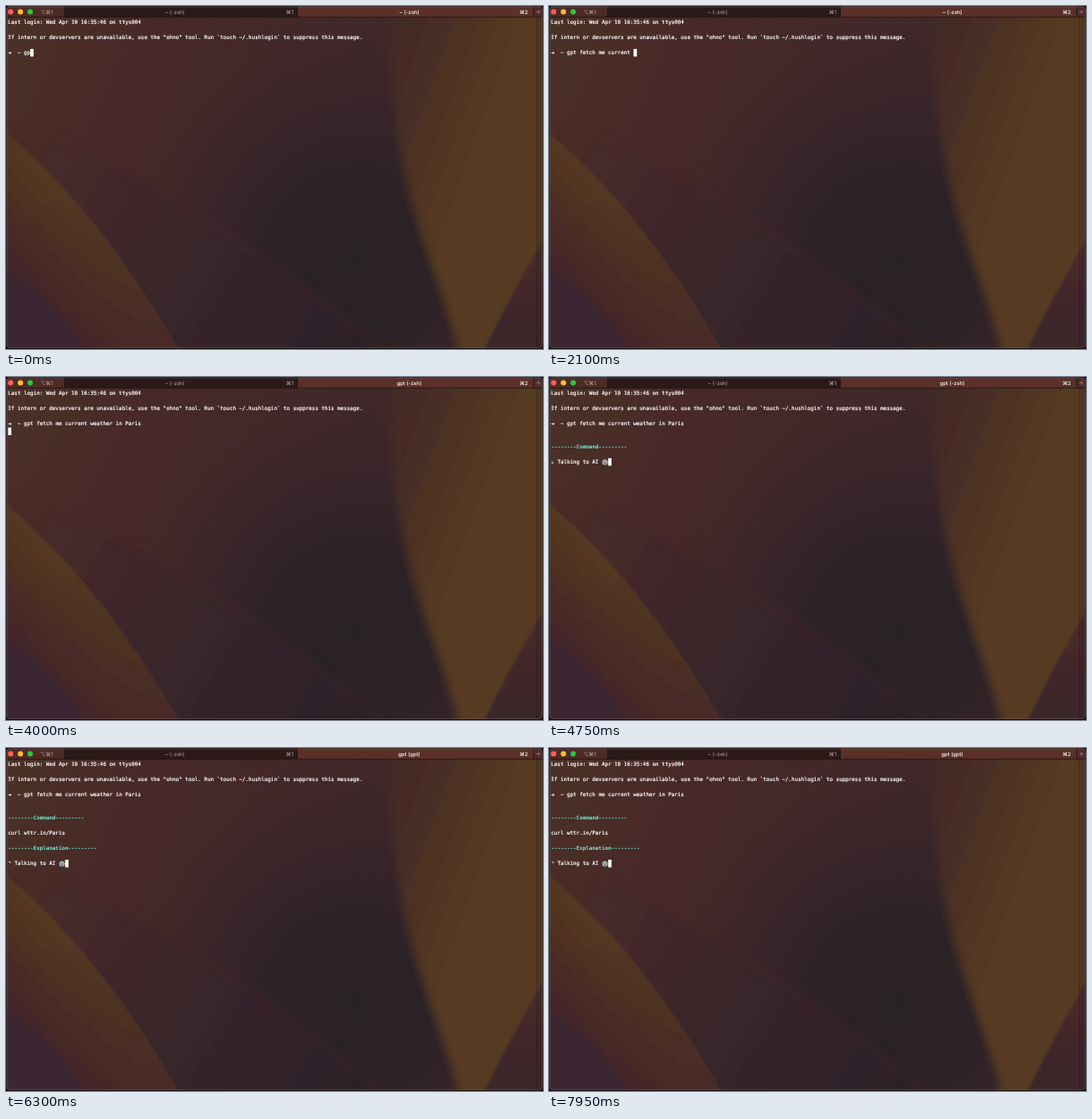
These frames come from a looping animation (600x384 px, 8000 ms). An HTML page:

```html
<!DOCTYPE html>
<html lang="en">
<head>
<meta charset="utf-8">
<title>Terminal</title>
<style>
  html, body { margin: 0; width: 100%; height: 100%; overflow: hidden; background: #2b2126; }
  svg { display: block; width: 600px; height: 384px; }
  text { white-space: pre; text-rendering: geometricPrecision; }
  #screen text { font: 5.89px "DejaVu Sans Mono", monospace; fill: #fff; stroke: #fff; stroke-width: .2px; }
  #screen .heading { font-weight: bold; fill: #70ecd4; stroke: none; }
  #screen .symbol { font: 4.84px "DejaVu Sans", sans-serif; }
  #bar text { font: 5.9px Inter, "DejaVu Sans", sans-serif; fill: #b9aba8; text-anchor: middle; }
  #bar .active { fill: #fff; font-weight: 500; }
</style>
</head>
<body>
<svg viewBox="0 0 600 384">
  <defs>
    <linearGradient id="sky" x2="1" y2=".3">
      <stop offset="0" stop-color="#4b3226"/>
      <stop offset=".25" stop-color="#482928"/>
      <stop offset=".5" stop-color="#432829"/>
      <stop offset=".75" stop-color="#3e2729"/>
      <stop offset="1" stop-color="#3c2629"/>
    </linearGradient>
    <radialGradient id="shade" gradientUnits="userSpaceOnUse" cx="390" cy="285" r="255">
      <stop offset="0" stop-color="#282225"/>
      <stop offset=".35" stop-color="#2b2227" stop-opacity=".92"/>
      <stop offset=".65" stop-color="#32232a" stop-opacity=".6"/>
      <stop offset="1" stop-color="#3a252a" stop-opacity="0"/>
    </radialGradient>
    <linearGradient id="band" gradientUnits="userSpaceOnUse" x1="0" y1="140" x2="390" y2="384">
      <stop offset="0" stop-color="#4a2d28"/>
      <stop offset=".3" stop-color="#43282a"/>
      <stop offset=".6" stop-color="#37252c"/>
      <stop offset="1" stop-color="#2c2328"/>
    </linearGradient>
    <linearGradient id="leaf" gradientUnits="userSpaceOnUse" x1="105" y1="240" x2="22" y2="308">
      <stop offset="0" stop-color="#543a20"/>
      <stop offset=".35" stop-color="#523421"/>
      <stop offset=".7" stop-color="#4a2c26"/>
      <stop offset="1" stop-color="#42282b"/>
    </linearGradient>
    <linearGradient id="leafFade" gradientUnits="userSpaceOnUse" x1="60" y1="210" x2="150" y2="384">
      <stop offset="0" stop-color="#45272a" stop-opacity="0"/>
      <stop offset="1" stop-color="#45272a" stop-opacity=".65"/>
    </linearGradient>
    <linearGradient id="petal" gradientUnits="userSpaceOnUse" x1="425" y1="60" x2="550" y2="105">
      <stop offset="0" stop-color="#432a27"/>
      <stop offset=".35" stop-color="#4a2e25"/>
      <stop offset=".75" stop-color="#523623"/>
      <stop offset="1" stop-color="#563b23"/>
    </linearGradient>
    <linearGradient id="corner" x2="0" y2="1">
      <stop offset="0" stop-color="#4b2c28"/>
      <stop offset=".5" stop-color="#43282a"/>
      <stop offset="1" stop-color="#39262d"/>
    </linearGradient>
    <filter id="soft" x="-20%" y="-20%" width="140%" height="140%"><feGaussianBlur stdDeviation="5"/></filter>
    <filter id="crisp" x="-20%" y="-20%" width="140%" height="140%"><feGaussianBlur stdDeviation=".9"/></filter>
  </defs>

  <g id="wallpaper">
    <rect width="600" height="384" fill="url(#sky)"/>
    <rect width="600" height="384" fill="url(#shade)"/>
    <path d="M428-20C430 80 433 130 448 200C464 270 490 320 509 400H640V-20Z" fill="url(#petal)" filter="url(#soft)"/>
    <path d="M610 246C582 292 553 345 530 394H610Z" fill="url(#corner)" filter="url(#crisp)"/>
    <path d="M-10 122C90 158 180 207 250 255C320 302 374 343 425 392H-10Z" fill="url(#band)" filter="url(#crisp)"/>
    <path d="M60 150C150 190 215 230 250 255C320 302 374 343 425 392" fill="none" stroke="#4a2b2c" stroke-width="5" opacity=".5" filter="url(#soft)"/>
    <g filter="url(#crisp)">
      <path id="leafShape" d="M-10 134C60 190 130 273 197 392H-10Z" fill="url(#leaf)"/>
      <use href="#leafShape" style="fill:none"/>
      <path d="M-10 134C60 190 130 273 197 392H-10Z" fill="url(#leafFade)"/>
    </g>
    <path d="M-10 290C35 313 65 345 94 392H-10Z" fill="#3a2730" filter="url(#crisp)"/>
    <rect x="592.5" y="12" width="7.5" height="372" fill="#1d1214" opacity=".1"/>
    <path d="M592.5 12V384" stroke="#1d1214" stroke-width=".8" opacity=".3"/>
  </g>

  <g id="bar">
    <rect width="600" height="12.5" fill="#4d2b27"/>
    <rect x="65" width="261" height="12.5" fill="#2c1a19"/>
    <rect x="326" width="264" height="12.5" fill="#5a3029"/>
    <path d="M65.5 0V12M325.5 0V12M589.5 0V12M0 12.4H600" stroke="#221413" stroke-width=".8"/>
    <circle cx="5.2" cy="6.4" r="3" fill="#fb5f57"/>
    <circle cx="16.1" cy="6.4" r="3" fill="#fdbd2e"/>
    <circle cx="27" cy="6.4" r="3" fill="#29c940"/>
    <text x="45.5" y="8.7">⌥⌘1</text>
    <text x="188.5" y="8.7">~ (-zsh)</text>
    <text x="317" y="8.7">⌘1</text>
    <text x="450.5" y="8.7" class="active" id="title"></text>
    <text x="578.5" y="8.7" class="active">⌘2</text>
    <path d="M592.3 6.5H597.3M595 4V9" stroke="#9b8781" stroke-width=".7"/>
  </g>

  <g id="frame" fill="none">
    <path d="M0 0H600V384H0ZM4 .5Q.5 .5 .5 4V379.5Q.5 383 4 383H596Q599.5 383 599.5 379.5V4Q599.5 .5 596 .5Z" fill="#120d0e" fill-rule="evenodd"/>
    <rect x="1" y="1" width="598" height="381.5" rx="3.5" stroke="#8a7672" stroke-width=".8" opacity=".45"/>
  </g>

  <g id="screen">
    <rect id="cursor" width="3.7" height="8.5" fill="#fff"/>
    <g id="robot">
      <path d="M3.5 .3V2" stroke="#d96a5c" stroke-width="1"/>
      <rect x=".2" y="2.7" width="6.6" height="2.6" rx=".7" fill="#d5685b"/>
      <rect x=".8" y="1.4" width="5.4" height="5.6" rx="1" fill="#b4bbbd"/>
      <path d="M1.6 3.3H3M4 3.3H5.4" stroke="#41717b" stroke-width="1.3"/>
      <path d="M2 5.6H5" stroke="#4d4b50" stroke-width="1"/>
    </g>
  </g>
</svg>
<script>
const LOOP = 8000, LEFT = 2.3, CELL = 3.546, TOP = 20, LINE = 8.56;
const COMMAND = "gpt fetch me current weather in Paris";
const SPINNER = "⠋⠙⠹⠸⠼⠴⠦⠧⠇⠏", SPIN_STEP = 84;
const ENTER = 4000, ASK_COMMAND = 4212, RETITLE = 4900, ASK_EXPLANATION = 5326;
// [time, characters typed]
const TYPING = [[0, 2], [2050, 21], [3100, 29], [3950, 37]];

const byId = id => document.getElementById(id);
const screen = byId("screen"), cursor = byId("cursor"), robot = byId("robot"), title = byId("title");
const colX = col => LEFT + col * CELL;
const rowY = row => TOP + row * LINE;

function addText(row, content = "", className = "", col = 0) {
  const node = document.createElementNS("http://www.w3.org/2000/svg", "text");
  node.setAttribute("x", colX(col));
  node.setAttribute("y", rowY(row));
  node.setAttribute("class", className);
  node.textContent = content;
  return screen.appendChild(node);
}

addText(0, "Last login: Wed Apr 19 16:35:46 on ttys004");
addText(2, 'If intern or devservers are unavailable, use the "ohno" tool. Run `touch ~/.hushlogin` to suppress this message.');
addText(4, "➜", "symbol");
addText(4, "~", "", 3);
const prompt = addText(4, "", "", 5);
const commandHeading = addText(7, "--------Command---------", "heading");
const answer = addText(9, "curl wttr.in/Paris");
const explanationHeading = addText(11, "--------Explanation---------", "heading");
const spinner = addText(9, "", "symbol");
const talking = addText(9, "Talking to AI", "", 2);

const show = (node, visible) => node.setAttribute("visibility", visible ? "visible" : "hidden");

function typedCount(t) {
  for (let i = 1; i < TYPING.length; i++) {
    const [t0, n0] = TYPING[i - 1], [t1, n1] = TYPING[i];
    if (t < t1) return Math.floor(n0 + (n1 - n0) * (t - t0) / (t1 - t0));
  }
  return COMMAND.length;
}

function placeCursor(col, row) {
  cursor.setAttribute("x", colX(col));
  cursor.setAttribute("y", rowY(row) - 6.2);
}

function render(t) {
  const asking = t >= ASK_COMMAND, explaining = t >= ASK_EXPLANATION;
  const typed = typedCount(t);
  prompt.textContent = COMMAND.slice(0, typed);
  title.textContent = t < ENTER ? "~ (-zsh)" : t < RETITLE ? "gpt (-zsh)" : "gpt (gpt)";

  for (const node of [commandHeading, spinner, talking, robot]) show(node, asking);
  for (const node of [answer, explanationHeading]) show(node, explaining);

  if (!asking) {
    if (t < ENTER) placeCursor(5 + typed, 4);
    else placeCursor(0, 5);
    return;
  }
  const row = explaining ? 13 : 9;
  const elapsed = t - (explaining ? ASK_EXPLANATION : ASK_COMMAND);
  spinner.textContent = SPINNER[Math.floor(elapsed / SPIN_STEP) % SPINNER.length];
  for (const node of [spinner, talking]) node.setAttribute("y", rowY(row));
  robot.setAttribute("transform", `translate(${colX(16)} ${rowY(row) - 5.8})`);
  placeCursor(18, row);
}

function frame() {
  render(performance.now() % LOOP);
  requestAnimationFrame(frame);
}
frame();
</script>
</body>
</html>
```
